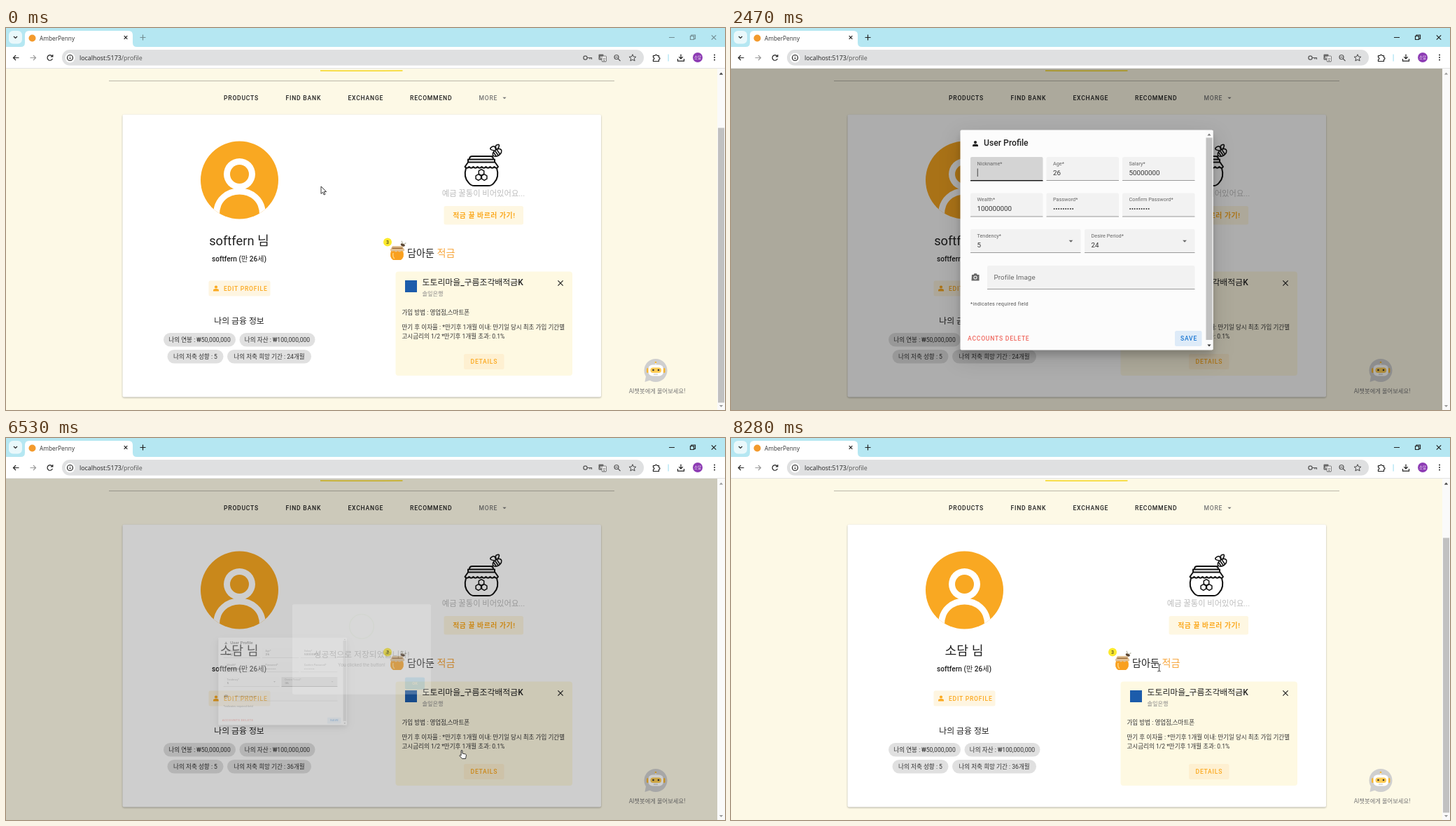
Write an HTML page that moves like this. It is 1027 by 545 pixels and loops after 8570 ms.

```html
<!DOCTYPE html>
<html lang="ko">
<head>
<meta charset="utf-8">
<title>Profile edit</title>
<style>
html, body { margin: 0; width: 100%; height: 100%; overflow: hidden; background: #fdf9e6; }
svg { display: block; width: 100vw; height: 100vh; font-family: Roboto, "Noto Sans CJK KR", "Noto Sans CJK", sans-serif; }
text { white-space: pre; }
.btn { font-size: 8.6px; font-weight: 500; letter-spacing: .089em; }
.med { font-weight: 500; }
.mid { text-anchor: middle; }
.ui { font-family: "Open Sans", "Noto Sans", sans-serif; }
.ln { fill: none; stroke: #222; stroke-width: 1.2; }
</style>
</head>
<body>
<svg id="stage" viewBox="0 0 1027 545" preserveAspectRatio="none"></svg>
<script>
const LOOP = 8570, FRAME = 98.7;
const ORANGE = '#fba91f';
const USER = 'softfern', NICK = '소담';

// ---- drawing helpers ----
const text = (x, y, s, size, fill = '#222', cls = '', more = '') =>
  `<text x="${x}" y="${y}" font-size="${size}" fill="${fill}" class="${cls}" ${more}>${s}</text>`;
const btn = (x, y, s, fill, more = '') => `<text x="${x}" y="${y}" fill="${fill}" class="btn" ${more}>${s}</text>`;
const rect = (x, y, w, h, fill, r = 0, more = '') =>
  `<rect x="${x}" y="${y}" width="${w}" height="${h}" rx="${r}" fill="${fill}" ${more}/>`;
const circle = (x, y, r, fill, more = '') => `<circle cx="${x}" cy="${y}" r="${r}" fill="${fill}" ${more}/>`;
const path = (d, more = 'class="ln"') => `<path d="${d}" ${more}/>`;
const group = (id, body, more = '') => `<g id="${id}" ${more}>${body}</g>`;
const cross = (x, y, r, more) => path(`M${x - r} ${y - r}l${2 * r} ${2 * r}m0 ${-2 * r}l${-2 * r} ${2 * r}`, more);
const tri = (x, y, w, h, fill) => path(`M${x - w} ${y - h / 2}h${2 * w}l${-w} ${h}z`, `fill="${fill}"`);
const person = (x, y, fill) => circle(x, y - 2, 2.1, fill) +
  path(`M${x - 4} ${y + 4}v-1.2q0-2.2 4-2.2t4 2.2v1.2z`, `fill="${fill}"`);
const hex = (x, y, r) => {
  const p = [...Array(6)].map((_, i) => {
    const a = Math.PI * (i / 3 + 1 / 6);
    return (x + r * Math.cos(a)).toFixed(2) + ' ' + (y + r * Math.sin(a)).toFixed(2);
  });
  return `M${p.join('L')}z`;
};

// ---- browser window ----
function browser() {
  const tools =
    path('M18.500 42.500h-8m3.500 -3.500l-3.500 3.500l3.500 3.500') +
    path('M34.500 42.500h8m-3.500 -3.500l3.500 3.500l-3.500 3.500', 'class="ln" style="stroke:#999"') +
    path('M66 40.300a3.800 3.800 0 1 0 .4 3.500M66.800 38v3h-3') +
    circle(91.500, 42.500, 7, '#fff') + circle(91.500, 42.500, 4, 'none', 'class="ln"') +
    path('M91.500 42v2.600M91.500 40.200v.9') +
    text(105, 46, 'localhost:5173<tspan fill="#555">/profile</tspan>', 8.9, '#222', 'ui') +
    circle(827.500, 42.500, 2.600, 'none', 'class="ln" style="stroke:#555"') +
    path('M830 42.500h6.500v2.200M834 42.500v2', 'class="ln" style="stroke:#555"') +
    rect(846.500, 37.500, 7, 8, '#666', 1) + rect(851, 40, 6.500, 8, '#eee', 1, 'stroke="#666" stroke-width=".8"') +
    text(848, 44, 'A', 5.500, '#fff', 'med') + text(851.800, 46.500, '文', 5, '#555') +
    circle(872, 41.500, 3, 'none', 'class="ln" style="stroke:#555"') +
    path('M874.300 43.800l3.200 3.200M870.500 41.500h3', 'class="ln" style="stroke:#555"') +
    path('M895 37.700l1.400 3.200 3.500.3-2.600 2.300.8 3.400-3.100-1.800-3.100 1.800.8-3.400-2.600-2.300 3.500-.3z', 'class="ln" style="stroke:#444;stroke-width:1"') +
    path('M924.500 39.500h2.500a1.500 1.500 0 0 1 3 0h2.500v2.500a1.500 1.500 0 0 1 0 3v2.500h-8v-2.500a1.500 1.500 0 0 0 0-3z') +
    rect(945.500, 37.500, 1.200, 10, '#a9e3f3') +
    path('M964 37.500v6.500m-2.800-2.800l2.800 2.800l2.800-2.800M959.500 44v3.200h9v-3.200') +
    circle(988, 42, 7, '#8d3cb4') + text(988, 44, NICK, 5.400, '#fff', 'mid') +
    [38.500, 42, 45.500].map(y => circle(1012, y, 1, '#222')).join('');
  return rect(0, 0, 1027, 28, '#b5e7f2') +
    rect(4, 4, 19, 18.500, '#e9f8fb', 6) + path('M11 12l2.500 2.500l2.500 -2.500') +
    path('M21 27q6 0 6-6v-11q0-6 6-6h142q6 0 6 6v11q0 6 6 6z', 'fill="#fff"') +
    circle(37.500, 14.500, 5, '#f39a2d') +
    text(48, 17.500, 'AmberPenny', 8.300, '#333', 'ui') + cross(171, 13.500, 2.300, 'class="ln"') +
    group('controls', path('M191.500 13.500h8m-4-4v8M947 13.500h8M977.500 11.500h5v5h-5zM979 11.500v-1.500h5.500v5.500h-1.500') +
      cross(1011, 13.500, 3.200, 'class="ln"')) +
    rect(0, 27, 1027, 30.500, '#fff') + rect(80, 31, 831, 22.500, '#dfe0e1', 11) + tools +
    rect(0, 57, 1027, 1, '#e3e3e3');
}

// ---- page ----
const avatar = () => circle(333.500, 217, 55.500, '#f9a822') +
  `<clipPath id="round"><circle cx="333.500" cy="217" r="55.500"/></clipPath><g clip-path="url(#round)" fill="none" stroke="#fff" stroke-width="9">` +
  path('M300.500 266c0-44 66-44 66 0', '') + `</g>` + circle(333.500, 208.500, 22.500, '#fff') + circle(333.500, 208.500, 13.500, '#f9a822');

const jar = () => `<g fill="none" stroke="#111" stroke-width="2" stroke-linejoin="round">` +
  path('M662 187q0-4 4-4h26q4 0 4 4M660 187.500h38v4h-38zM660 191.500l-4.500 6.500q3 3.500 6 0q3 3.500 6 0q3 3.500 6 0q3 3.500 6 0q3 3.500 6 0q3 3.500 6 0q3 3.500 6 0q3 3.500 5.500 0l-4.500-6.500M657 200q-4 13 4 21q3 4 8 4h20q5 0 8-4q8-8 4-21', '') +
  path(hex(674.800, 213, 4.300) + hex(683.200, 213, 4.300) + hex(679, 206, 4.300), 'stroke-width="1.500"') +
  `<g transform="rotate(-35 701 177)" stroke-width="1.600"><ellipse cx="701" cy="178" rx="7" ry="4.500"/><path d="M697 174.500v7M700 173.500v9M703 174v8M699 173q-6-6 0-6t3 6M703 173q1-6 5-4t-3 5M694 178h-3"/></g></g>`;

const smallJar = () => path('M550 318q-3 9 3 13h11q6-4 3-13z', 'fill="#f9a01f"') +
  path('M553 321q-1 6 2 8', 'fill="none" stroke="#ffd27a" stroke-width="1.500"') +
  path('M552 311h14l3.500 6q-2.500 3-5 1q-2.500 3-5 0q-2.500 3-5 0q-3 2-6-1z', 'fill="#e2c194"') +
  rect(551.500, 313.500, 15, 1.500, '#9b6a35') +
  `<g transform="rotate(25 567 309)"><ellipse cx="567" cy="309.500" rx="3.200" ry="1.900" fill="#5b4634"/><path d="M566 308l-3-3M568 308l2-3" stroke="#bba" stroke-width="1.300"/></g>`;

const bot = () => path('M914 497l-1.500 8l9-3z', 'fill="#cfcfcf"') + circle(928, 488.500, 16.500, '#cfcfcf') +
  rect(915, 485, 3, 7, '#f6b52f', 1.500) + rect(938.500, 485, 3, 7, '#f6b52f', 1.500) +
  rect(917.500, 480.500, 21.500, 16, '#fff', 6) + rect(920.500, 484.500, 15.500, 7.500, '#fbcb54', 3.500) +
  circle(924.500, 488, 1.300, '#333') + circle(932, 488, 1.300, '#333') +
  path('M928 480.500v-3', 'stroke="#fff"') + circle(928, 477, 1.300, '#f6b52f') + rect(925, 493.500, 6, 1, '#bbb');

function page() {
  const nav = [[311, 'PRODUCTS'], [399.500, 'FIND BANK'], [488.500, 'EXCHANGE'], [577, 'RECOMMEND']]
    .map(([x, s]) => btn(x, 103, s, '#222')).join('');
  const chips = [[225, 435, 103, '나의 연봉 : ₩50,000,000'], [333.500, 435, 108, '나의 자산 : ₩100,000,000'],
    [230.500, 459, 80, '나의 저축 성향 : 5'], [316, 459, 120, '나의 저축 희망 기간 : <tspan id="months">24</tspan>개월']]
    .map(([x, y, w, s]) => rect(x, y, w, 19.500, '#e0e0e0', 9.750) + text(x + w / 2, y + 13, s, 8.600, '#333', 'mid')).join('');
  return rect(0, 58, 1016, 487, '#fdf9e6') +
    path('M449 60.800q58 .7 117.500 0', 'fill="none" stroke="#f8dc38" stroke-width="1.800"') +
    rect(147, 75, 722, 1, '#bbb8aa') + nav + btn(675.500, 103, 'MORE', '#777') + tri(712, 100, 2.600, 2.600, '#777') +
    rect(166.500, 123.500, 683.500, 403, '#fff', 2, 'style="filter:drop-shadow(0 1px 1px rgba(0,0,0,.3))"') +
    avatar() +
    `<text id="nick" x="333" y="310" class="mid" font-size="18.300" fill="#222"></text>` +
    text(333, 333, USER + ' (만 26세)', 10.100, '#222', 'mid med') +
    rect(289.500, 360.500, 88, 22, '#fef5e1', 2.500) +
    `<clipPath id="editBox"><rect x="289.500" y="360.500" width="88" height="22" rx="2.500"/></clipPath>` +
    `<circle id="editRipple" cx="362" cy="367" r="0" fill="${ORANGE}" opacity=".2" clip-path="url(#editBox)"/>` +
    person(300, 371.500, ORANGE) + btn(311, 374.600, 'EDIT PROFILE', ORANGE) +
    text(333, 422.300, '나의 금융 정보', 11.900, '#222', 'mid med') + chips +
    jar() + text(682, 240, '예금 꿀통이 비어있어요...', 11.300, '#bdbdbd', 'mid') +
    rect(625.500, 254, 113.500, 26.500, '#fef7e2', 2.500) +
    text(682.800, 271.200, '적금 꿀 바르러 가기!', 9.800, ORANGE, 'mid', 'font-weight="700" letter-spacing=".6"') +
    smallJar() + circle(545, 305.500, 6, '#fcea2c') + text(545, 308, '3', 7, '#222', 'mid') +
    text(573, 326, '담아둔 <tspan fill="#f7a63c">적금</tspan>', 14.100, '#222', 'med') +
    rect(556.500, 347.500, 252.500, 148.500, '#fef9e2', 4) + rect(570, 360, 17, 17, '#1c5cab') +
    text(594.500, 366.800, '도토리마을_구름조각배적금K', 11.900, '#222', 'med') +
    text(594.500, 381.500, '솔잎은행', 8.200, '#888') + cross(792, 364, 3.600, 'class="ln"') +
    text(565.500, 409, '가입 방법 : 영업점,스마트폰', 8.550, '#333') +
    text(565.500, 430.300, '만기 후 이자율 : *만기후 1개월 이내: 만기일 당시 최초 가입 기간별', 8.550, '#333') +
    text(565.500, 442.600, '고시금리의 1/2 *만기후 1개월 초과: 0.1%', 8.550, '#333') +
    rect(654, 465, 57.500, 22, '#fef0d1', 2.500) + btn(663.500, 479, 'DETAILS', ORANGE) +
    bot() + text(930, 520.600, 'AI챗봇에게 물어보세요!', 8.300, '#777', 'mid');
}

const scrollbar = () => rect(1016, 58, 11, 487, '#fafafa') +
  tri(1021.500, 65, 2.600, -3, '#999') + tri(1021.500, 539.500, 2.600, 3, '#999') +
  group('thumb', rect(1017, 142.500, 9, 392, '#c1c1c1') + tri(1021.500, 65, 2.600, -3, '#444'));

// ---- dialog ----
const field = (x, y, w, label, value, id = '') =>
  `<rect class="fill" ${id && `id="${id}Fill"`} x="${x}" y="${y}" width="${w}" height="33.500" rx="2"/>` +
  `<rect ${id && `id="${id}Line"`} x="${x}" y="${y + 33}" width="${w}" height="1" fill="#9a9a9a"/>` +
  text(x + 9.500, y + 11.600, label, 7.300, '#666') +
  text(x + 9.500, y + 25.600, value, 9.800, '#333', '', id && `id="${id}Value"`);

function dialog() {
  const dots = '•'.repeat(9);
  const body = person(349, 165, '#222') + text(361, 168.200, 'User Profile', 12.200, '#222', 'med') +
    field(342, 184, 103.500, 'Nickname*', USER, 'name') +
    rect(351, 200, 36, 12, '#3390ff', 0, 'id="select"') + text(351.500, 209.600, USER, 9.800, '#fff', '', 'id="selected"') +
    rect(351.800, 200.500, .8, 11.500, '#222', 0, 'id="caret"') + rect(352, 211.500, 9, .7, '#333', 0, 'id="compose"') +
    field(450.500, 184, 103.500, 'Age*', '26') + field(559, 184, 103.500, 'Salary*', '50000000') +
    field(342, 235.500, 103.500, 'Wealth*', '100000000') + field(450.500, 235.500, 103.500, 'Password*', dots) +
    field(559, 235.500, 103.500, 'Confirm Password*', dots) +
    field(342, 287, 157.500, 'Tendency*', '5') + field(505, 287, 157.500, 'Desire Period*', '24', 'period') +
    tri(485.500, 304.200, 2.900, 3, '#666') + group('down', tri(648, 304.200, 2.900, 3, '#666')) + group('up', tri(648, 303.600, 2.900, -3, '#222')) +
    field(366, 339, 296.500, '', '') + text(375.500, 359, 'Profile Image', 9.800, '#666', '', 'letter-spacing=".09"') +
    path('M344 352h2.500l1-1.700h3.200l1 1.700h2.800v8.600h-11z', 'fill="#666"') + circle(349, 356, 2.600, '#fcfcfc') + circle(349, 356, 1.600, '#666') +
    text(342, 396, '*indicates required field', 7.300, '#555', '', 'letter-spacing=".24"') +
    btn(338, 446.200, 'ACCOUNTS DELETE', '#f0685f') +
    rect(634, 432, 38.500, 22, '#deebf8', 2.500) + btn(642, 446.200, 'SAVE', '#1976d2');
  const shadow = 'drop-shadow(0 7px 5px rgba(0,0,0,.15)) drop-shadow(0 10px 15px rgba(0,0,0,.16))';
  return rect(327.500, 145.500, 361, 314, '#fcfcfc', 2, `style="filter:${shadow}"`) + group('form', body) +
    rect(677.500, 146, 11, 313, '#fafafa') + rect(678.500, 156.500, 9, 288.500, '#c1c1c1') +
    tri(683, 152, 2.600, -3, '#777') + tri(683, 453, 2.600, 3, '#333');
}

function menu() {
  const items = ['6', '12', '24', '36'].map((s, i) => text(514.500, 343.300 + i * 28.800, s, 9.800, '#333')).join('');
  return rect(504.500, 322, 158.500, 124, '#fdfdfd', 2, 'style="filter:drop-shadow(0 2px 3px rgba(0,0,0,.35))"') +
    `<clipPath id="lastItem"><rect x="504.500" y="412" width="158.500" height="28.800"/></clipPath>` +
    rect(504.500, 412, 158.500, 28.800, '#f3f3f3', 0, 'id="hover"') +
    `<circle id="ripple" cx="580" cy="426" r="0" fill="#c6c6c6" clip-path="url(#lastItem)"/>` + items;
}

// ---- alert ----
const alertBox = () => rect(362.500, 207, 291, 189, '#fff', 3) +
  circle(508, 253.500, 25.500, 'none', 'stroke="#a5dc86" stroke-opacity=".28" stroke-width="2.400"') +
  path('M495 255l8.500 8.500l20-20', 'id="tick" fill="none" stroke="#a5dc86" stroke-width="3.200" stroke-linecap="round" stroke-linejoin="round" pathLength="100" stroke-dasharray="100 200"') +
  text(508, 318, '성공적으로 저장되었습니다!', 17.400, '#595959', 'mid med') +
  text(508, 338.200, 'You clicked the button!', 9.800, '#5c5c5c', 'mid') +
  rect(599, 360.500, 41.500, 25, '#7cd1f9', 3) + text(619.800, 376.200, 'OK', 8.600, '#fff', 'mid', 'font-weight="700"');

const pointers =
  group('arrow', path('M0 0v10.500l2.500-2.300l1.700 3.800l1.700-.8l-1.700-3.600h3.400z', 'fill="#fff" stroke="#222" stroke-width=".9"')) +
  group('hand', path('M-.9 1q.9-1.600 1.800 0v4l4.500 1q1.200.4 1 2l-.9 4.500h-5l-3.800-4.500q.4-1.500 2.400 0z', 'fill="#fff" stroke="#222" stroke-width=".9" stroke-linejoin="round"')) +
  group('beam', path('M-2.200-5q2.200 0 2.200 1v8q0 1 2.200 1M2.200-5q-2.200 0-2.200 1M0 4q0 1-2.200 1', 'fill="none" stroke="#222" stroke-width=".9"'));

document.getElementById('stage').innerHTML = page() + scrollbar() +
  rect(0, 58, 1016, 487, '#000', 0, 'id="scrim"') + group('dialog', dialog()) + group('menu', menu()) +
  rect(0, 58, 1016, 487, '#000', 0, 'id="shade"') + group('alert', alertBox()) + browser() + group('cursor', pointers);

// ---- timeline ----
const el = {};
document.querySelectorAll('[id]').forEach(e => el[e.id] = e);
const fills = document.querySelectorAll('.fill');
const set = (id, o) => { for (const k in o) el[id].setAttribute(k, o[k]); };
const show = (id, on) => set(id, { visibility: on ? 'visible' : 'hidden' });
const ramp = (t, a, b) => Math.min(1, Math.max(0, (t - a) / (b - a)));
const within = (t, a, b) => t >= a && t < b;
const last = (table, t) => table.filter(r => r[0] <= t).pop();

// cubic-bezier(0, 0, .2, 1)
function decel(x) {
  let lo = 0, hi = 1;
  for (let i = 0; i < 20; i++) {
    const s = (lo + hi) / 2;
    if (.6 * s * s + .4 * s * s * s < x) lo = s; else hi = s;
  }
  return lo * lo * (3 - 2 * lo);
}

// piecewise-linear [time, ...values]
function track(table, t) {
  const i = table.findIndex(r => r[0] > t);
  if (i < 0) return table[table.length - 1].slice(1);
  if (!i) return table[0].slice(1);
  const a = table[i - 1], b = table[i], u = ramp(t, a[0], b[0]);
  return a.slice(1).map((v, k) => v + (b[k + 1] - v) * u);
}

const MOVES = [[300, 450, 226], [690, 362, 366], [1000, 362, 366], [1184, 372, 322], [1660, 350, 206], [1700, 350, 206],
  [1974, 608, 202], [4150, 608, 202], [4244, 576, 269], [4640, 618, 303], [5040, 618, 303], [5428, 580, 422],
  [5830, 580, 422], [6215, 651, 445], [6720, 651, 445], [7200, 627, 371], [7410, 627, 371], [7600, 620, 367],
  [7896, 620, 367], [8285, 611.5, 328]];
const SHAPES = [[0, 'arrow'], [680, 'hand'], [1080, 'arrow'], [1580, 'beam'], [2460, ''], [4240, 'beam'], [4430, 'arrow'],
  [5220, 'hand'], [5900, 'arrow'], [6200, 'hand'], [6600, 'arrow'], [7000, 'hand'], [8080, 'beam']];
const TYPED = [[0, USER], [2460, ''], [3250, 'ㅅ'], [3350, '소'], [3450, '솓'], [3545, '소다'], [3745, NICK]];
const POP = [[0, .5], [135, 1.05], [240, .95], [300, 1]];

function draw(t) {
  const saved = t > 6500;
  el.nick.textContent = (saved ? NICK : USER) + ' 님';
  el.months.textContent = saved ? '36' : '24';
  set('controls', { opacity: t < 880 ? .45 : 1 });
  set('editRipple', { r: within(t, 880, 1080) ? 25 + (t - 880) * .4 : 0 });
  show('thumb', !within(t, 1018, 6560));

  // dialog grows out of the edit button
  const p = t < 6430 ? decel(ramp(t, 1018, 1243)) : 1 - ramp(t, 6430, 6560), q = 1 - p;
  set('scrim', { opacity: .32 * (t < 6430 ? ramp(t, 1018, 1180) : p) });
  show('dialog', p > 0);
  set('dialog', { opacity: p, transform:
    `translate(${508 - 174.5 * q} ${302.5 + 69 * q}) scale(${1 - .76 * q} ${1 - .93 * q}) translate(-508 -302.5)` });
  set('form', { opacity: ramp(t, 1050, 1350) });

  const naming = within(t, 1670, 4730), picking = t >= 4730;
  fills.forEach(f => f.setAttribute('fill-opacity', t < 1250 || t > 4300 ? .008 : .04));
  for (const [id, on] of [['name', naming], ['period', picking]]) {
    if (on) set(id + 'Fill', { 'fill-opacity': .16 });
    set(id + 'Line', { fill: on ? '#111' : '#9a9a9a', height: on ? 1.4 : 1 });
  }
  const typed = last(TYPED, t)[1];
  el.nameValue.textContent = typed;
  const marked = within(t, 1770, 2460), typing = within(t, 3250, 4730);
  set('select', { width: 36 * ramp(t, 1690, 1790) });
  ['select', 'selected'].forEach(id => show(id, marked && p > 0));
  const end = 351.8 + 9 * typed.length;
  set('caret', { x: end });
  show('caret', within(t, 2460, 4730) && !within(t, 2950, 3050));
  set('compose', { x: end - 9 });
  show('compose', typing);

  const open = within(t, 4730, 5960);
  el.periodValue.textContent = t < 5900 ? '24' : '36';
  show('up', open);
  show('down', !open && p > 0);
  const m = decel(ramp(t, 4730, 4980)) * (1 - ramp(t, 5880, 6020));
  show('menu', m > 0);
  set('menu', { opacity: m, transform: `translate(0 ${-8 * (1 - m)})` });
  set('hover', { opacity: t > 5400 ? 1 : 0 });
  set('ripple', { r: Math.max(0, t - 5640) * .625 });

  // alert pops in, then fades with its overlay
  const veil = ramp(t, 6470, 6670) * (1 - ramp(t, 7800, 8100));
  const s = track(POP, t - 6470)[0];
  set('shade', { opacity: .4 * veil });
  show('alert', veil > 0);
  set('alert', { opacity: veil * (t < 7000 ? .98 : 1) * (1 - ramp(t, 7800, 8050)),
    transform: `translate(508 301.5) scale(${s}) translate(-508 -301.5)` });
  const drawn = ramp(t, 6875, 7320);
  set('tick', { 'stroke-dashoffset': 100 * (1 - drawn), opacity: drawn > 0 ? 1 : 0 });

  const [x, y] = track(MOVES, t), shape = last(SHAPES, t)[1];
  set('cursor', { transform: `translate(${x} ${y})` });
  ['arrow', 'hand', 'beam'].forEach(id => show(id, id === shape));
}

const start = performance.now();
function tick() {
  const t = (performance.now() - start) % LOOP;
  draw(Math.floor((t + 16) / FRAME) * FRAME);
  requestAnimationFrame(tick);
}
tick();
</script>
</body>
</html>
```
